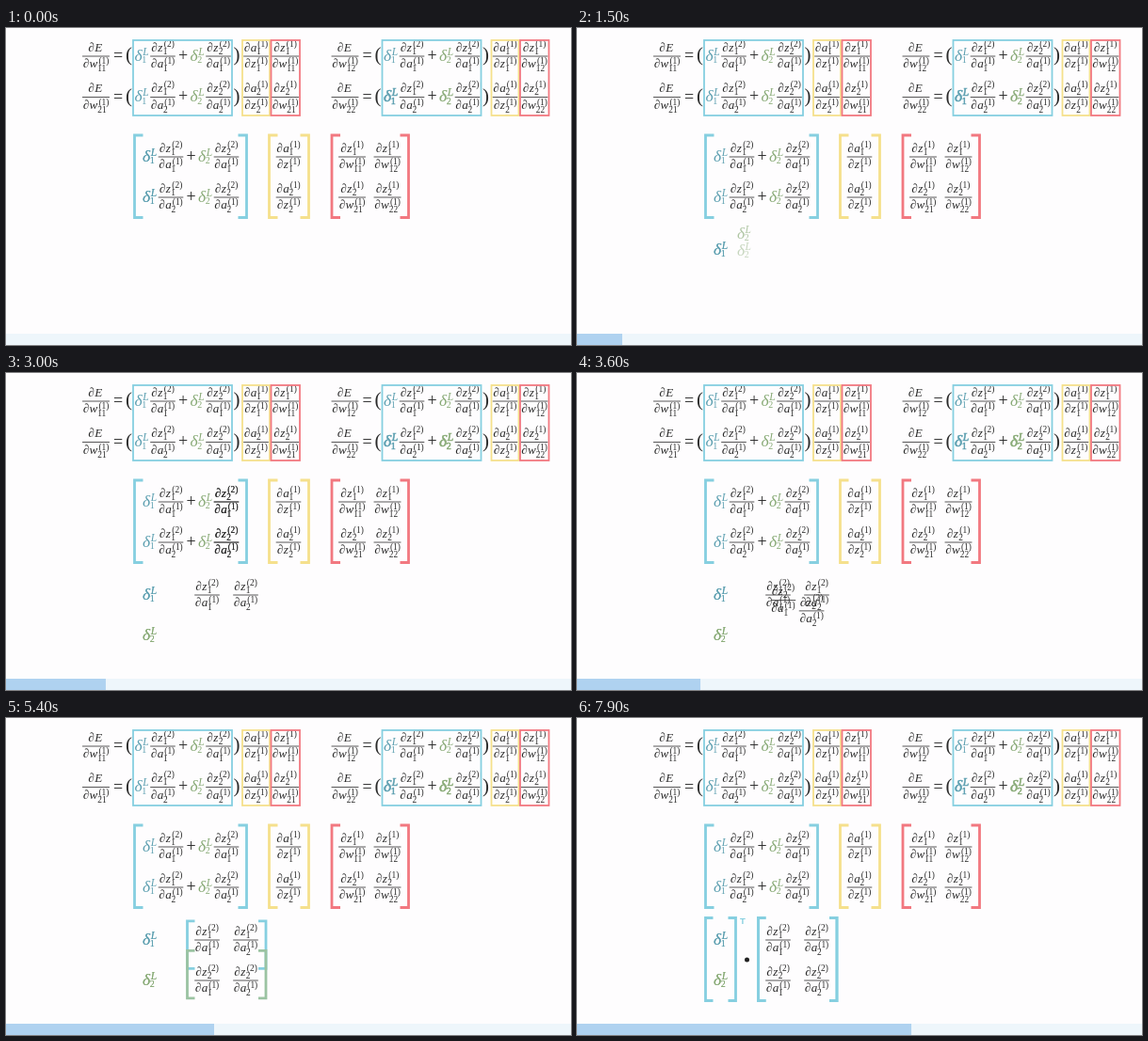
An HTML page for the animation above (8000 ms loop, 600 px wide and 337 px high).

```html
<!DOCTYPE html>
<html lang="en">
<head>
<meta charset="utf-8">
<title>Backpropagation in matrix form</title>
<style>
html, body { margin: 0; height: 100%; overflow: hidden; background: #fefdfe; }
svg { display: block; width: 600px; height: 337px; }
text { font-family: "Liberation Serif", Tinos, serif; fill: #2b2b2b; }
.var { font-size: 13.2px; font-style: italic; }
.script { font-size: 9.4px; }
.sign { font-size: 18px; text-anchor: middle; }
.paren { font-size: 21px; text-anchor: middle; }
.bar { stroke: #2b2b2b; stroke-width: .8; }
.delta { font-size: 17.5px; font-style: italic; }
.sup { font-size: 11.5px; font-style: italic; }
.delta, .sup, .sub { fill: inherit; stroke: inherit; }
.sub { font-size: 10px; }
.t { font: bold 9.5px "Liberation Sans", Arial, sans-serif; transform-box: fill-box; }
</style>
</head>
<body>
<svg id="stage" viewBox="0 0 600 337"></svg>
<script>
const BLUE = '#86cfe0', YELLOW = '#f5e08c', RED = '#f27880', GREEN = '#a3bf8b';
const DELTA = { 1: '#5c9fb0', 2: '#88aa76' };
const ROWS = [30, 73.5], MID = [137, 180], LOW = [236, 279];
const stage = document.getElementById('stage');

function el(tag, attrs, parent = stage, content = '') {
  const node = document.createElementNS('http://www.w3.org/2000/svg', tag);
  for (const k in attrs) node.setAttribute(k, attrs[k]);
  node.textContent = content;
  parent.appendChild(node);
  return node;
}
const text = (s, x, y, cls, parent) => el('text', { x, y, class: cls }, parent, s);
const place = (node, x, y) => node.setAttribute('transform', `translate(${x} ${y})`);
function group(x, y) {
  const g = el('g', {});
  place(g, x, y);
  return g;
}

// A partial such as 'z1^2': variable, subscript, layer in parentheses.
const WIDTH = { z: 6, a: 6.9, w: 9.2, E: 9.4 };
function parse(term) {
  const [head, layer] = term.split('^');
  const v = head[0];
  return { v, sub: head.slice(1), layer, width: 6.9 + WIDTH[v] + (layer ? 11.6 : 0) };
}
function partial(term, y, rise, drop, g) {
  const { v, sub, layer, width } = parse(term);
  const x = -width / 2, sx = x + 7.2 + WIDTH[v];
  text('∂', x, y, 'var', g);
  text(v, x + 6.9, y, 'var', g);
  if (!layer) return;
  text(sub, sx - .8, y + drop, 'script', g);
  text(`(${layer})`, sx + .4, y - rise, 'script', g);
}
function frac(top, bottom, x, y) {
  const g = group(x, y);
  const half = Math.max(parse(top).width, parse(bottom).width) / 2 + .6;
  el('line', { x1: -half, x2: half, y1: 0, y2: 0, class: 'bar' }, g);
  partial(top, -5.3, 5.2, 3.2, g);
  partial(bottom, 12.4, 4.2, 4, g);
  return g;
}
function delta(i, x, y) {
  const g = group(x, y);
  g.setAttribute('fill', DELTA[i]);
  text('δ', -7.5, 4.7, 'delta', g);
  text('L', 1.2, -1.3, 'sup', g);
  text(i, .3, 7.2, 'sub', g);
  return g;
}
function embolden(g, i, width) {
  g.setAttribute('stroke', DELTA[i]);
  g.setAttribute('stroke-width', width);
}
function box(x, w, color) {
  el('rect', { x, y: 13, width: w, height: 80, fill: 'none', stroke: color, 'stroke-width': 1.8 });
}
const sidePath = (x, y1, y2, foot) => `M${x + foot} ${y2}H${x}V${y1}H${x + foot}`;
function side(x, y1, y2, foot, color) {
  return el('path', {
    d: sidePath(x, y1, y2, foot), fill: 'none', stroke: color,
    'stroke-width': 2.8, pathLength: 1, 'stroke-dasharray': '1 2'
  });
}
const brackets = (x1, x2, y1, y2, foot, color) =>
  [side(x1, y1, y2, foot, color), side(x2, y1, y2, -foot, color)];
const drawn = (path, p) => path.setAttribute('stroke-dashoffset', 1 - p);

// The bracketed sum shared by the equations and the first matrix.
function sum(x, y, row) {
  const first = delta(1, x, y);
  frac('z1^2', `a${row}^1`, x + 22.5, y);
  text('+', x + 44, y + 4.8, 'sign');
  const second = delta(2, x + 59, y);
  frac('z2^2', `a${row}^1`, x + 81.5, y);
  return [first, second];
}

const heavy = [];
[0, 264.5].forEach((dx, col) => {
  ROWS.forEach((y, i) => {
    const r = i + 1, w = `w${r}${col + 1}^1`;
    frac('E', w, 95.5 + dx, y);
    text('=', 119 + dx, y + 5, 'sign');
    text('(', 130.5 + dx, y + 5.3, 'paren');
    const pair = sum(144 + dx, y, r);
    if (col && i) heavy.push(...pair);
    text(')', 245 + dx, y + 5.3, 'paren');
    frac(`a${r}^1`, `z${r}^1`, 265.5 + dx, y);
    frac(`z${r}^1`, w, 296.5 + dx, y);
  });
  box(135 + dx, 105, BLUE);
  box(251 + dx, 29, YELLOW);
  box(281.5 + dx, 30.5, RED);
});
embolden(heavy[0], 1, .6);

MID.forEach((y, i) => {
  const r = i + 1;
  sum(152.5, y, r);
  frac(`a${r}^1`, `z${r}^1`, 300, y);
  frac(`z${r}^1`, `w${r}1^1`, 367.5, y);
  frac(`z${r}^1`, `w${r}2^1`, 405, y);
});
brackets(136.5, 255.5, 114, 201.5, 9, BLUE);
brackets(279.5, 321.5, 114, 201.5, 9, YELLOW);
brackets(346, 427.5, 114, 201.5, 9, RED);

// Copies that travel from the first matrix to the lower rows.
const moves = [];
const move = (node, from, to, start, dim = 0) => moves.push({ node, from, to, start, dim });
for (const k of [0, 1]) {
  const from = MID[k], col = 213.5 + 41 * k, under = `a${k + 1}^1`;
  move(delta(1), [152.5, from], [152.5, LOW[0]], -30);
  move(delta(2), [211.5, from], [152.5, LOW[1]], 970, .35 + .2 * k);
  move(frac('z1^2', under), [175, from], [col, LOW[0]], 1965);
  move(frac('z2^2', under), [234, from], [col, LOW[1]], 3000);
}

const rowBrackets = [[217, 254, BLUE], [260, 297, GREEN]].map(([y1, y2, color]) =>
  ({ y1, y2, color, sides: brackets(192.5, 276, y1, y2, 8, color) }));
const [left, right] = brackets(136.5, 168.5, 212.5, 300.5, 8, BLUE);
const power = text('T', 173, 218.5, 't');
power.style.fill = BLUE;
const dot = el('circle', { cx: 180.5, cy: 257, r: 2.5, fill: '#222' });

el('rect', { y: 325, width: 600, height: 12, fill: '#eef6fb' });
const progress = el('rect', { y: 325, height: 12, fill: '#afd2f0' });
const PACE = [[0, 0], [900, 28], [1500, 48], [2500, 85], [3600, 131],
  [4700, 185], [6200, 262], [7900, 355], [8000, 360.5]];

const mix = (a, b, p) => a + (b - a) * p;
const sigmoid = x => 1 / (1 + Math.exp(-x));
function smooth(t, start, length = 1000) {
  const s = Math.min(1, Math.max(0, (t - start) / length)), edge = sigmoid(-5);
  return Math.min(1, Math.max(0, (sigmoid(10 * s - 5) - edge) / (1 - 2 * edge)));
}
function paceAt(t) {
  const i = PACE.findIndex(p => p[0] > t), [t0, x0] = PACE[i - 1], [t1, x1] = PACE[i];
  return mix(x0, x1, (t - t0) / (t1 - t0));
}

function render(t) {
  progress.setAttribute('width', paceAt(t));
  embolden(heavy[1], 2, t < 2000 ? .25 : .6);

  for (const { node, from, to, start, dim } of moves) {
    const p = smooth(t, start);
    place(node, mix(from[0], to[0], p), mix(from[1], to[1], p));
    node.setAttribute('opacity', t < start ? 0 : 1 - dim * Math.sin(Math.PI * p));
  }

  const shown = smooth(t, 3950, 750), merge = smooth(t, 5000);
  for (const { y1, y2, color, sides } of rowBrackets) {
    sides.forEach((path, i) => {
      path.setAttribute('d', sidePath(i ? 276 : 192.5,
        mix(y1, 212.5, merge), mix(y2, 300.5, merge), i ? -8 : 8));
      path.style.stroke = `color-mix(in srgb, ${BLUE} ${merge * 100}%, ${color})`;
      drawn(path, shown);
    });
  }

  drawn(left, smooth(t, 6050, 700));
  drawn(right, smooth(t, 6200, 800));
  const cut = t < 6050 ? 100 : mix(72, 0, smooth(t, 6050, 700));
  power.style.clipPath = `inset(0 0 ${cut}% 0)`;
  dot.setAttribute('opacity', smooth(t, 7150, 700));
}

function tick() {
  render(performance.now() % 8000);
  requestAnimationFrame(tick);
}
tick();
</script>
</body>
</html>
```
